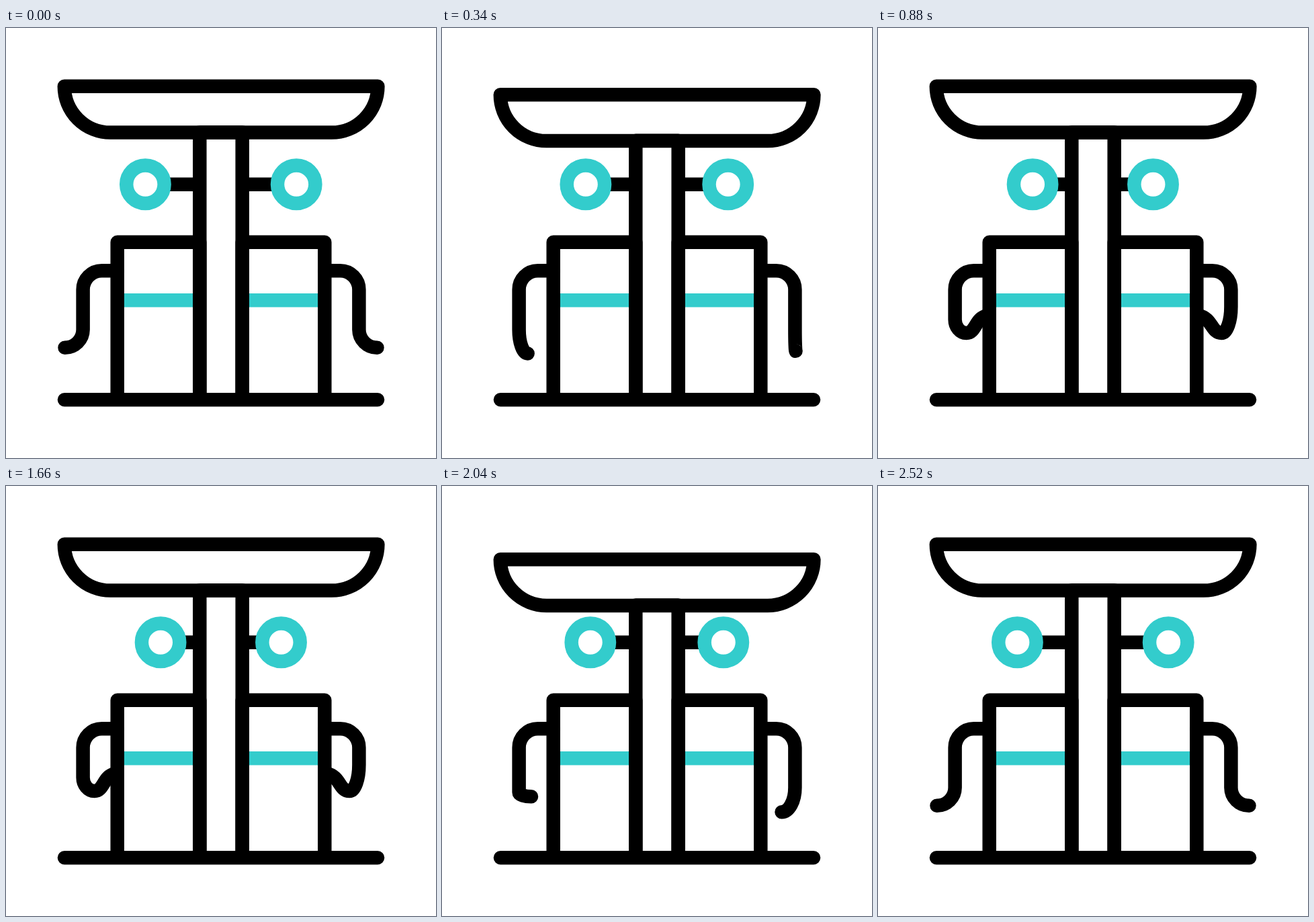
An HTML page with a canvas for the animation above (3600 ms loop, 640 by 640 pixels).

```html
<!DOCTYPE html>
<html lang="en">
<head>
<meta charset="utf-8">
<title>Fuel station</title>
<style>
html, body { margin: 0; width: 100%; height: 100%; overflow: hidden; background: #fff; }
canvas { display: block; width: 640px; height: 640px; }
</style>
</head>
<body>
<canvas id="stage" width="640" height="640"></canvas>
<script>
const ctx = document.getElementById('stage').getContext('2d');
const SIZE = 640, LOOP = 3600, STEP = 20, MOVE = 880, BACK = 1640;
const INK = '#000', TEAL = '#33cccc';
const LEFT = 165.7, POLE_L = 288.3, POLE_R = 351.7, RIGHT = 474.3;
const GROUND = 553.2;

const clamp = x => Math.min(1, Math.max(0, x));
const mix = (a, b, k) => a + (b - a) * k;

// cubic-bezier(.5, 0, .5, 1)
function ease(x) {
  x = clamp(x);
  let lo = 0, hi = 1;
  for (let i = 0; i < 24; i++) {
    const t = (lo + hi) / 2;
    if (1.5 * t * (1 - t) + t * t * t < x) lo = t; else hi = t;
  }
  return lo * lo * (3 - 2 * lo);
}

// Key points: progress, where the straight part ends, tip x, tip y.
// The right hose uses mirrored coordinates.
const REST = [0, 449, 87.5, 475.8];
const hoses = [
  {
    hook: 31,
    there: [REST, [0.286, 449, 127.7, 484.5], [0.786, 449, 138.3, 479.8]],
    back: [REST, [0.59, 456, 133, 462.3]],
    end: [1, 434, 162.5, 428]
  },
  {
    hook: 34, mirror: true,
    there: [REST, [0.286, 449, 113.5, 480.8], [0.786, 425, 145.7, 464]],
    back: [REST, [0.59, 449, 134.5, 485.2]],
    end: [1, 415, 162.5, 428]
  }
];

function pose(keys, k) {
  let i = 1;
  while (i < keys.length - 1 && k > keys[i][0]) i++;
  const a = keys[i - 1], b = keys[i];
  const f = (k - a[0]) / (b[0] - a[0]);
  return a.map((v, j) => mix(v, b[j], f));
}

function stroke(color, draw) {
  ctx.strokeStyle = color;
  ctx.beginPath();
  draw();
  ctx.stroke();
}

function line(color, x1, y1, x2, y2, cap = 'butt') {
  ctx.lineCap = cap;
  stroke(color, () => { ctx.moveTo(x1, y1); ctx.lineTo(x2, y2); });
}

// Rounded corner: leaves vertically, arrives horizontally.
function corner(x1, y1, x2, y2) {
  ctx.bezierCurveTo(x1, mix(y1, y2, 0.55), mix(x2, x1, 0.55), y2, x2, y2);
}

function drawHose(h, k, back) {
  const [, drop, x, y] = pose([...(back ? h.back : h.there), h.end], k);
  const curl = clamp((k - 0.75) / 0.25);
  const dipX = x - h.hook * curl, dipY = y + 26 * curl;
  const side = 114.6, bend = 28;

  ctx.save();
  if (h.mirror) {
    ctx.translate(SIZE, 0);
    ctx.scale(-1, 1);
  }
  ctx.lineCap = 'round';
  stroke(INK, () => {
    ctx.moveTo(LEFT, 361.3);
    ctx.arcTo(side, 361.3, side, 361.3 + bend, bend);
    ctx.lineTo(side, drop);
    corner(side, drop, dipX, dipY);
    ctx.bezierCurveTo(mix(dipX, x, 0.47), dipY, mix(dipX, x, 0.4), mix(y, dipY, 0.15), x, y);
  });
  ctx.restore();
}

function drawLamp(x, pole) {
  const y = 232.7, r = 28.2;
  line(INK, x + Math.sign(pole - x) * r, y, pole, y);
  stroke(TEAL, () => ctx.arc(x, y, r, 0, Math.PI * 2));
}

// Two legs and a top bar standing on the ground.
function drawFrame(x1, x2, top) {
  ctx.lineCap = 'butt';
  stroke(INK, () => {
    ctx.moveTo(x1, GROUND);
    ctx.lineTo(x1, top);
    ctx.lineTo(x2, top);
    ctx.lineTo(x2, GROUND);
  });
}

function drawPump(x1, x2) {
  line(TEAL, x1, 405.3, x2, 405.3);
  drawFrame(x1, x2, 318.8);
}

function drawRoof(dy) {
  const x1 = 86.8, x2 = 553.4, top = 86.8 + dy, r = 68.8;
  stroke(INK, () => {
    ctx.moveTo(x1, top);
    ctx.lineTo(x2, top);
    ctx.arc(x2 - r, top, r, 0, Math.PI / 2);
    ctx.arc(x1 + r, top, r, Math.PI / 2, Math.PI);
    ctx.closePath();
  });
}

function roofDip(t) {
  return 25 * (ease((t - 220) / 240) - ease((t - 460) / 256));
}

function render(time) {
  const back = time >= BACK;
  const t = back ? time - BACK : time;
  const e = ease(t / MOVE);
  const k = back ? 1 - e : e;
  const shift = 22.7 * k;
  const dip = roofDip(t);

  ctx.fillStyle = '#fff';
  ctx.fillRect(0, 0, SIZE, SIZE);
  ctx.lineWidth = 20.5;
  ctx.lineJoin = 'round';

  drawLamp(207.4 + shift, POLE_L);
  drawLamp(432.2 - shift, POLE_R);
  for (const h of hoses) drawHose(h, k, back);
  drawPump(LEFT, POLE_L);
  drawPump(POLE_R, RIGHT);
  drawRoof(dip);
  drawFrame(POLE_L, POLE_R, 155.2 + dip);
  line(INK, 87, GROUND, 553, GROUND, 'round');
}

const start = performance.now();
function frame() {
  const t = (performance.now() - start) % LOOP;
  render(Math.floor(t / STEP) * STEP);
  requestAnimationFrame(frame);
}
frame();
</script>
</body>
</html>
```
